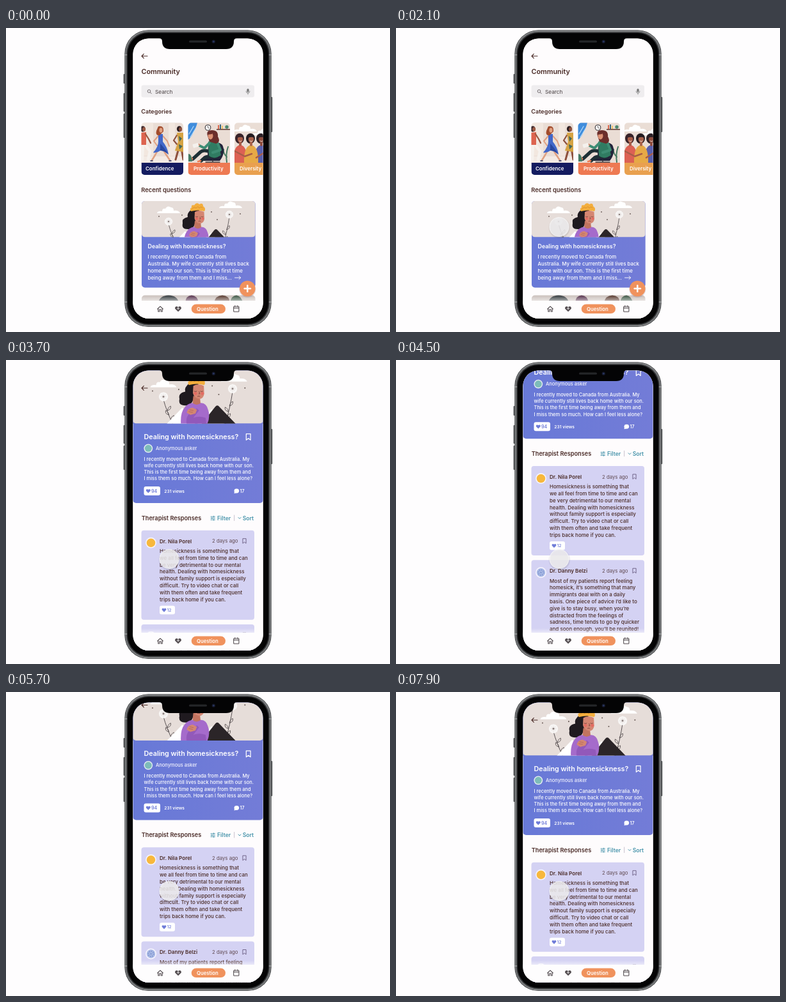
An HTML page that plays this animation: 600 px wide and 476 px high, repeating every 8 s.

```html
<!DOCTYPE html>
<html lang="en">
<head>
<meta charset="utf-8">
<title>Community app</title>
<style>
html, body { margin: 0; width: 100%; height: 100%; overflow: hidden; background: #fefdfe; }
svg { display: block; width: 100%; height: 100%; }
text { font-family: Inter, "Open Sans", sans-serif; white-space: pre; }
</style>
</head>
<body>
<svg id="stage" viewBox="0 0 600 476" xmlns="http://www.w3.org/2000/svg"></svg>
<script>
const BROWN = '#4a2b27', BLUE = '#6f7cd8', LILAC = '#d4d2f3', ORANGE = '#f0925d',
  INK = '#2b2528', TEAL = '#4794ab', SKIN = '#d48672', SAND = '#e6ddd9';

const text = (x, y, size, str, fill = BROWN, weight = 500) =>
  `<text x="${x}" y="${y}" font-size="${size}" fill="${fill}" font-weight="${weight}">${str}</text>`;
const lines = (x, y, size, step, rows, fill, weight) =>
  rows.map((row, i) => text(x, y + i * step, size, row, fill, weight)).join('');
const rect = (x, y, w, h, r, fill, more = '') =>
  `<rect x="${x}" y="${y}" width="${w}" height="${h}" rx="${r}" fill="${fill}" ${more}/>`;
const circle = (x, y, r, fill, more = '') => `<circle cx="${x}" cy="${y}" r="${r}" fill="${fill}" ${more}/>`;
const oval = (x, y, rx, ry, fill) => `<ellipse cx="${x}" cy="${y}" rx="${rx}" ry="${ry}" fill="${fill}"/>`;
const fill = (d, color) => `<path d="${d}" fill="${color}"/>`;
const line = (d, color, w = 1) =>
  `<path d="${d}" fill="none" stroke="${color}" stroke-width="${w}" stroke-linecap="round" stroke-linejoin="round"/>`;
const clip = (id, inner) => `<clipPath id="${id}">${inner}</clipPath>`;
const grad = (id, stops, dir = 'x2="0" y2="1"') => `<linearGradient id="${id}" ${dir}>` +
  stops.map(([o, c, a = 1]) => `<stop offset="${o}" stop-color="${c}" stop-opacity="${a}"/>`).join('') + '</linearGradient>';

const heart = (x, y, s, color) =>
  `<path transform="translate(${x} ${y}) scale(${s})" d="M0 4.5L-4.2 .3C-6-2-3-5.5 0-2.6C3-5.5 6-2 4.2 .3Z" fill="${color}"/>`;
const bookmark = (x, y, s, color) =>
  `<path transform="translate(${x} ${y}) scale(${s})" d="M-3-4.3H3V4.3L0 2L-3 4.3Z" fill="none" stroke="${color}" stroke-width="1.1" stroke-linejoin="round"/>`;
const cloud = (x, y) => fill(`M${x - 18} ${y + 5}q1-4 8-3q0-5 5-4q3-6 9-2q4 0 4 5q8-1 10 4Z`, '#fff');

function dandelion(x, y, footX, footY) {
  let s = line(`M${x} ${y + 4}Q${x + (footX - x) * .3} ${(y + footY) / 2} ${footX} ${footY}`, '#4b4446', .8);
  for (const [k, side] of [[.42, 1], [.58, -1], [.76, 1]]) {
    const lx = x + (footX - x) * k, ly = y + (footY - y) * k + 3;
    s += line(`M${lx} ${ly}q${side} -5 ${side * 4.5} -6q${side} 5 ${side * -4.5} 6`, '#5b5354', .8);
  }
  s += circle(x, y, 5.8, '#f7f5f4', 'stroke="#fff" stroke-width="1" stroke-dasharray="1 .7"');
  for (let i = 0; i < 8; i++) {
    const a = i * Math.PI / 4;
    s += line(`M${x} ${y}l${3.6 * Math.cos(a)} ${3.6 * Math.sin(a)}`, '#d0c8c5', .4);
  }
  return s + circle(x, y, 1.3, '#8b7f7d');
}

function scene() {
  return cloud(254, 285) + cloud(351, 277) +
    dandelion(254, 303, 267, 341) + dandelion(349, 292, 339, 341) +
    [[239, 295], [275, 293], [330, 300], [366, 291], [321, 288]].map(([x, y]) => circle(x, y, .9, '#6a5c58')).join('') +
    fill('M258 341L280 318L298 341Z', '#fff') + fill('M300 341L320 320L338 341Z', '#fbf9f8') +
    fill('M306 341L325 317Q328 313 331 317L354 341Z', INK) +
    // hair, body, face, arm
    fill('M290 284Q282 290 284 296Q274 298 276 306Q274 315 284 315Q292 316 295 307L302 304V284Z', '#1f1a1f') +
    fill('M278 341Q277 325 283 318Q287 312 294 311.5L306 311.5Q313 312 315 320Q319 330 314 341Z', '#a56bcb') +
    fill('M295 302L304 303L305 312Q299 316 294 311.5Z', '#c27460') +
    fill('M295 288Q302 284 309.500 288L310 299Q309 306 303 306Q296 305 294.500 298Z', SKIN) +
    circle(298, 298.5, 2.1, '#e46b62') + circle(307.5, 298.5, 2.1, '#e46b62') +
    line('M296.5 295.5q1.7 1 3.2 0M305 295.500q1.600 1 3 0M303 296l1 3h-1.500M301 302.500q1.500-1 3 0', '#5a2d2c', .6) +
    fill('M289 287Q286 283 290 281Q289 276 294 277.500Q298 272 302 276Q308 273 308 279Q313 282 310 287Q300 284 289 287Z', '#f3ae3d') +
    line('M291 283q3-4 6-1q3-4 5 0q2-3 5-1', '#d38623', .7) +
    fill('M286 341Q284 331 290 326L300 319L303 322L295 332Q303 329 312 332L313 341Z', '#9259ba') +
    fill('M286 325Q287 319 294 318L300 321L298 326L291 328Z', SKIN) +
    line('M290 321l5 1M289 323.5l5 1', '#9f5648', .5);
}

const head = (x, y, hair, skin) => oval(x - 1.2, y, 3.9, 4.5, hair) + oval(x + .6, y + .6, 2.5, 3.4, skin);

const runway = () =>
  fill('M211 148H230V200H211ZM254 148H264V200H254Z', '#f2e7df') + rect(211, 201, 67, 11, 0, '#f3eae4') +
  // left figure in trousers
  line('M214 182L213 206M217 182L225 193L222 206', '#f6f2ee', 4.5) +
  fill('M210 164L219 163L219 183H210Z', '#dd6450') + line('M218 166l5 8l3 6', '#9c5a45', 2.3) +
  head(215, 158, '#38242a', '#9c5a45') +
  // centre figure in a swinging dress
  line('M239 188L233 199L228 207M244 188L250 198L256 207', '#e0a081', 2.6) +
  line('M238 169L231 177L236 184M245 169L252 177L255 185', '#e0a081', 2) +
  fill('M238 166L245 166L245 178Q252 186 254 198Q246 191 241 192Q236 196 230 195Q238 186 238 178Z', '#4267c9') +
  fill('M241 181Q247 187 254 198Q246 191 241 192Z', '#29479f') +
  fill('M238 154Q247 152 246 162L240 168Q233 169 235 161Z', '#a24c2d') + oval(242, 160, 2.6, 3.7, '#e0a081') +
  line('M226 208h3M255 208h3', '#27315f', 1.5) +
  // right figure in a patterned outfit
  line('M270 188L265 206M274 188L277 206', '#8d503d', 3) + line('M267 168L262 176L267 182', '#8d503d', 2.2) +
  fill('M267 164H277V194L264 192L269 178Z', '#d5a343') + fill('M270 169l5 4l-4 5ZM270 182l6 3l-5 5Z', '#486958') +
  head(272, 158, '#2b1d20', '#8d503d');

const office = () =>
  fill('M284 148H299Q297 157 293 162Q290 172 284 175Z', '#408ddc') + line('M286 166L293 154M288 171L296 158', '#b8dcfa', 1.2) +
  circle(315.5, 156, 4.3, '#fff', 'stroke="#39353a" stroke-width="1.1"') + line('M315.5 153.5V156L317.5 157', INK, .7) +
  rect(329, 158, 21, 1.6, 0, '#66423a') + rect(331, 152, 2, 6, 0, '#dc6950') + rect(334, 151, 2, 7, 0, '#41697e') +
  rect(337, 153, 2, 5, 0, '#f0c367') + circle(345, 155, 2.7, '#4f876d') +
  line('M345 210Q343 197 347 186M345 202Q339 196 340 190', '#447960', 2) +
  fill('M316 185Q328 174 338 183Q344 195 334 208H309Q304 200 315 199Z', '#23243a') +
  line('M323 207v3M312 210h22', '#3a343a', 1.4) +
  line('M328 199Q311 188 304 194L292 205M326 202Q312 199 305 208', '#1d2f35', 5.2) +
  line('M291 205l-3-3M304 208l-4 1', '#ef7b52', 2.5) +
  fill('M316 178Q323 173 331 178L336 199Q325 207 317 200Z', '#307c62') +
  line('M318 180L310 188L302 184M331 181L335 191L323 195', '#3e8d74', 4) + circle(301, 183, 2, '#d58c70') +
  fill('M315 169Q312 160 322 160Q332 160 331 170Q336 179 328 181L318 178Z', '#6b2e2b') + oval(319.5, 169, 4, 5.4, '#dc9274') +
  fill('M315 167Q314 160 324 161L322 166Z', '#6b2e2b') +
  rect(292, 181, 9, 6, 1, '#f4f1ed', 'transform="rotate(-18 296 184)"') +
  fill('M285 197q5 0 6 12h-6Z', '#437a64');

function person(x, y, hair, skin, shirt) {
  return oval(x - 1, y + 1, 7, 8, hair) + fill(`M${x - 11} 212Q${x - 12} ${y + 13} ${x} ${y + 11}Q${x + 12} ${y + 13} ${x + 11} 212Z`, shirt) +
    rect(x - 2, y + 5, 4, 8, 2, skin) + oval(x, y + 2, 4.2, 5.7, skin) +
    fill(`M${x - 6} ${y + 1}Q${x - 4} ${y - 8} ${x + 5} ${y - 3}L${x + 5} ${y}Q${x - 1} ${y - 3} ${x - 6} ${y + 1}Z`, hair) +
    line(`M${x - 1.5} ${y + 5}q1.8 1.6 3.4 0`, '#fff', .8);
}
const friends = () => cloud(374, 157) + cloud(403, 163) +
  person(366, 172, '#37232a', '#a85d48', '#dc6154') + person(399, 172, '#2b2026', '#8f4d3e', '#5960ad') +
  person(383, 172, '#241c21', '#a9624c', '#e6a946') +
  line('M358 193L373 201L384 197M391 203L402 196', '#a85d48', 2.5);

function category(x, label, labelX, color, art, i) {
  return clip('cat' + i, rect(x, 148.5, 65.5, 81.5, 5, '#000')) +
    `<g clip-path="url(#cat${i})">` + rect(x, 148, 67, 64, 0, '#eaddd5') + art + rect(x, 211, 67, 20, 0, color) +
    text(labelX, 223, 7.95, label, '#fff', 600) + '</g>';
}

const home = () => rect(198, 16, 204, 440, 0, '#fefcfd') +
  text(211.5, 71.7, 10.8, 'Community', BROWN, 600) +
  rect(211.5, 89.5, 176.5, 19, 3, '#efedef') +
  circle(223.5, 99, 2.3, 'none', 'stroke="#655d60" stroke-width=".9"') + line('M225.3 100.8l2 2', '#655d60', .9) +
  text(233, 102.7, 8.2, 'Search', '#5d5557', 500) +
  rect(376.4, 95, 3.2, 5.6, 1.6, '#777') + line('M375 99q0 3 3 3t3-3M378 102v2', '#777', .7) +
  text(211.3, 134, 9.1, 'Categories', BROWN, 600) +
  category(211.5, 'Confidence', 218, '#141b60', runway(), 0) +
  category(284.5, 'Productivity', 293, '#ee7952', office(), 1) +
  category(357, 'Diversity', 365, '#e9a04f', friends(), 2) +
  text(211.3, 256.7, 9.3, 'Recent questions', BROWN, 600) +
  rect(212, 418.5, 177.5, 30, 5, '#cfc5c1') +
  fill('M238 430Q240 419 254 418.500Q268 419 270 430Z', '#454a4d') + fill('M280 430Q281 419 290 418.500Q299 419 301 430Z', '#65435c') +
  fill('M325 430Q327 419 338 418.500Q349 419 350 430Z', '#674b42') + fill('M350 430Q352 419 360 418.500Q368 420 370 430Z', '#4d6555');

const cardText = () => text(221.5, 344.5, 8.9, 'Dealing with homesickness?', '#fff', 600) +
  lines(221.5, 361, 7.9, 11, ['I recently moved to Canada from', 'Australia. My wife currently still lives back',
    'home with our son. This is the first time', 'being away from them and I miss...'], '#fff') +
  line('M357.5 391h9M364 388.5l2.7 2.5l-2.7 2.5', '#fff', .9);

const plus = () => circle(377.3, 409, 13, '#5a3b50', 'opacity=".18"') + circle(377.3, 408, 12.3, ORANGE) +
  line('M377.3 403.3v9.4M372.6 408h9.4', '#fff', 2.5);

function response(y, name, avatar, rows, likes) {
  return rect(211.5, y, 176.5, 140, 4, LILAC) +
    circle(226.5, y + 19.5, 8.4, '#f6f4fd') + avatar(226.5, y + 19.5) +
    text(240, y + 19.8, 8.1, name, BROWN, 600) + text(322, y + 19.7, 7.8, '2 days ago', '#604a52', 400) +
    bookmark(372.5, y + 16.7, .86, '#6c6085') +
    lines(240, y + 35.3, 8, 10.8, rows) +
    rect(240, y + 118, 24, 13.5, 3, '#fff') + heart(247, y + 124.7, .72, BLUE) + text(251.5, y + 127.3, 6.8, likes, BLUE, 500);
}

const question = () => text(215.5, 124, 10.75, 'Dealing with homesickness?', '#fff', 600) + bookmark(378.7, 120.5, 1.12, '#fff') +
  circle(222.3, 138.3, 6.9, '#e7edf3') + circle(222.3, 138.3, 5.5, '#7dbcb9') +
  text(234, 141, 7.5, 'Anonymous asker', '#f3f3fd') +
  lines(215.5, 157.8, 7.47, 10.2, ['I recently moved to Canada from Australia. My', 'wife currently still lives back home with our son.',
    'This is the first time being away from them and', 'I miss them so much. How can I feel less alone?'], '#fff') +
  rect(215.5, 198, 25.5, 14, 3, '#fff') + heart(222.3, 205, .74, BLUE) + text(227, 207.8, 7.1, '94', BLUE, 600) +
  text(247.3, 207.7, 6.7, '231 views', '#fff', 600) +
  oval(360.3, 205, 3.8, 3.4, '#fff') + fill('M357 206l-.5 3 3-.8Z', '#fff') + text(365.5, 207.6, 6.9, '17', '#fff', 600);

const thread = () => text(211.7, 250.7, 9.2, 'Therapist Responses', BROWN, 600) +
  line('M320 245.2h6.5M320 247.7h6.5M320 250.2h6.5M324.5 244.3v1.8M321.8 246.8v1.8M324.5 249.3v1.8', TEAL, .9) +
  text(330, 250.7, 8.6, 'Filter', TEAL, 600) + line('M356.7 243v8.5', '#b9b1c0', .8) +
  line('M363 246.5l2 2l2-2', TEAL, 1) + text(369.7, 250.7, 8.6, 'Sort', TEAL, 600) +
  response(266.7, 'Dr. Nila Porel', (x, y) => circle(x, y, 6.8, '#f7b83d'),
    ['Homesickness is something that', 'we all feel from time to time and can', 'be very detrimental to our mental',
      'health. Dealing with homesickness', 'without family support is especially', 'difficult. Try to video chat or call',
      'with them often and take frequent', 'trips back home if you can.'], '12') +
  response(414, 'Dr. Danny Belzi', (x, y) => circle(x, y, 6.7, '#a9b9e5') +
      circle(x, y, 4, 'none', 'stroke="#7f95cf" stroke-width="2" stroke-dasharray="1.5 1.6"') + circle(x, y, 1.2, '#7f95cf'),
    ['Most of my patients report feeling', 'homesick, it’s something that many', 'immigrants deal with on a daily',
      'basis. One piece of advice I’d like to', 'give is to stay busy, when you’re', 'distracted from the feelings of',
      'sadness, time tends to go by quicker', 'and soon enough, you’ll be reunited!'], '8');

const nav = () => rect(198, 420, 204, 8, 0, 'url(#fade)') + rect(198, 427, 204, 30, 0, '#fefdfe') +
  line('M236.7 440L241 435.8L245.3 440M237.8 439.2V444H239.8V440.8H242.2V444H244.2V439.2', '#514a4e', 1.1) +
  heart(269, 439.7, 1.03, '#514a4e') + line('M269 437.4v3.6M267.2 439.2h3.6', '#fff', .8) +
  rect(289.7, 432.5, 53.3, 14.6, 7.3, ORANGE) + text(298, 442.7, 7.75, 'Question', '#fff', 600) +
  rect(355.7, 436, 8.2, 8.2, .8, 'none', 'stroke="#514a4e" stroke-width="1.1"') +
  line('M356 438.5h7.6M357.8 434.8v1.5M361.8 434.8v1.5', '#514a4e', 1.1);

// nested outlines from the metal rim in to the bezel
const shell = (inset, color) =>
  rect(185.3 + inset, 3.2 + inset, 229.4 - inset * 2, 464.8 - inset * 2, 37 - inset, color);
const phoneBack = () =>
  [[72, 15], [102, 29], [134, 38]].map(([y, h]) => rect(183.5, y, 3, h, 1, '#5c5e60')).join('') +
  rect(413.5, 108, 2.8, 55, 1, '#5c5e60') +
  shell(0, '#3d3f41') + shell(.8, 'url(#metal)') + shell(2.4, '#5a5c5e') + shell(3.5, '#2c2d2f') + shell(4.8, '#040405') +
  line('M185.5 42h3M411.5 42h3M185.500 429h3M411.500 429h3', '#a0a2a4', 1.6);

const notch = () => fill('M239 16Q244 16 244 21Q244 33 256 33H344Q356 33 356 21Q356 16 361 16Z', '#040405') +
  rect(286, 19.6, 28, 3.2, 1.6, '#242629') + circle(324.3, 21.2, 2.7, '#15192a') + circle(324.3, 21.2, 1.2, '#2b3968');

const stage = document.getElementById('stage');
stage.innerHTML = '<defs>' +
  clip('screen', rect(198.4, 16.4, 203.2, 438.4, 24.5, '#000')) + clip('frame', '<rect id="window" rx="5"/>') +
  grad('fade', [[0, '#fefdfe', 0], [1, '#fefdfe', .6]]) +
  grad('metal', [[0, '#8b8d8f'], [.06, '#77797b'], [.5, '#909294'], [.94, '#77797b'], [1, '#8b8d8f']]) +
  grad('blue', [[0, '#6879d7'], [1, '#737cd7']], 'x2="1" y2="0"') +
  '<radialGradient id="shade"><stop offset=".78" stop-color="#4b4650" stop-opacity=".24"/><stop offset="1" stop-color="#4b4650" stop-opacity="0"/></radialGradient>' +
  '</defs>' + rect(0, 0, 600, 476, 0, '#fefdfe') + phoneBack() +
  `<g clip-path="url(#screen)">
    ${rect(198, 16, 204, 440, 0, '#fefcfd')}
    <g id="home">${home()}</g>
    <g id="scroll">
      <g id="sheet">${rect(198, 100, 204, 520, 0, '#fefcfd')}</g>
      <rect id="card" rx="5" fill="url(#blue)"/>
      <g clip-path="url(#frame)"><rect id="sky" fill="${SAND}"/><g id="scene">${scene()}</g></g>
      <g id="cardText">${cardText()}</g>
      <g id="detail">${question()}${thread()}</g>
      ${line('M221 44H212M215.3 40.7L212 44L215.3 47.3', BROWN, 1.2)}
    </g>
    <g id="plus">${plus()}</g>
    ${nav()}
  </g>` + notch() +
  `<g id="touch">${circle(.4, 1.4, 17.5, 'url(#shade)')}${circle(0, 0, 15, '#f1eff1', 'fill-opacity=".84" stroke="#fff" stroke-opacity=".6" stroke-width="1.2"')}</g>`;

const part = id => document.getElementById(id);
const set = (id, attrs) => { for (const k in attrs) part(id).setAttribute(k, attrs[k]); };
const mix = (a, b, k) => a + (b - a) * k;
const span = (t, from, length) => Math.min(1, Math.max(0, (t - from) / length));
const easeOut = u => 1 - (1 - u) ** 3;
const easeBoth = u => u * u * (3 - 2 * u);

function draw(t) {
  const open = easeBoth(span(t, 2200, 400));
  const scroll = 103 * (easeOut(span(t, 3780, 1000)) - easeOut(span(t, 5350, 900)));
  const reach = easeOut(span(t, 1300, 600));

  const x = mix(212, 198.3, open), width = mix(177.7, 203.4, open), top = mix(271, 10, open);
  const box = { x, width, y: top };
  set('card', { ...box, height: mix(135.5, 214, open) });
  for (const id of ['window', 'sky']) set(id, { ...box, height: mix(56.5, 89.5, open) });
  set('scene', { transform: `translate(${mix(0, -42.8, open)} ${mix(0, -287, open)}) scale(${mix(1, 1.137, open)})` });

  for (const id of ['home', 'cardText', 'plus']) set(id, { opacity: 1 - open });
  for (const id of ['sheet', 'detail']) set(id, { opacity: open });
  set('scroll', { transform: `translate(0 ${-scroll})` });
  set('touch', { transform: `translate(${mix(-20, 255, reach)} ${mix(335, 311.5, reach)})` });
}

function tick() {
  draw(Math.floor(performance.now() % 8000 / 100) * 100);
  requestAnimationFrame(tick);
}
tick();
</script>
</body>
</html>
```
